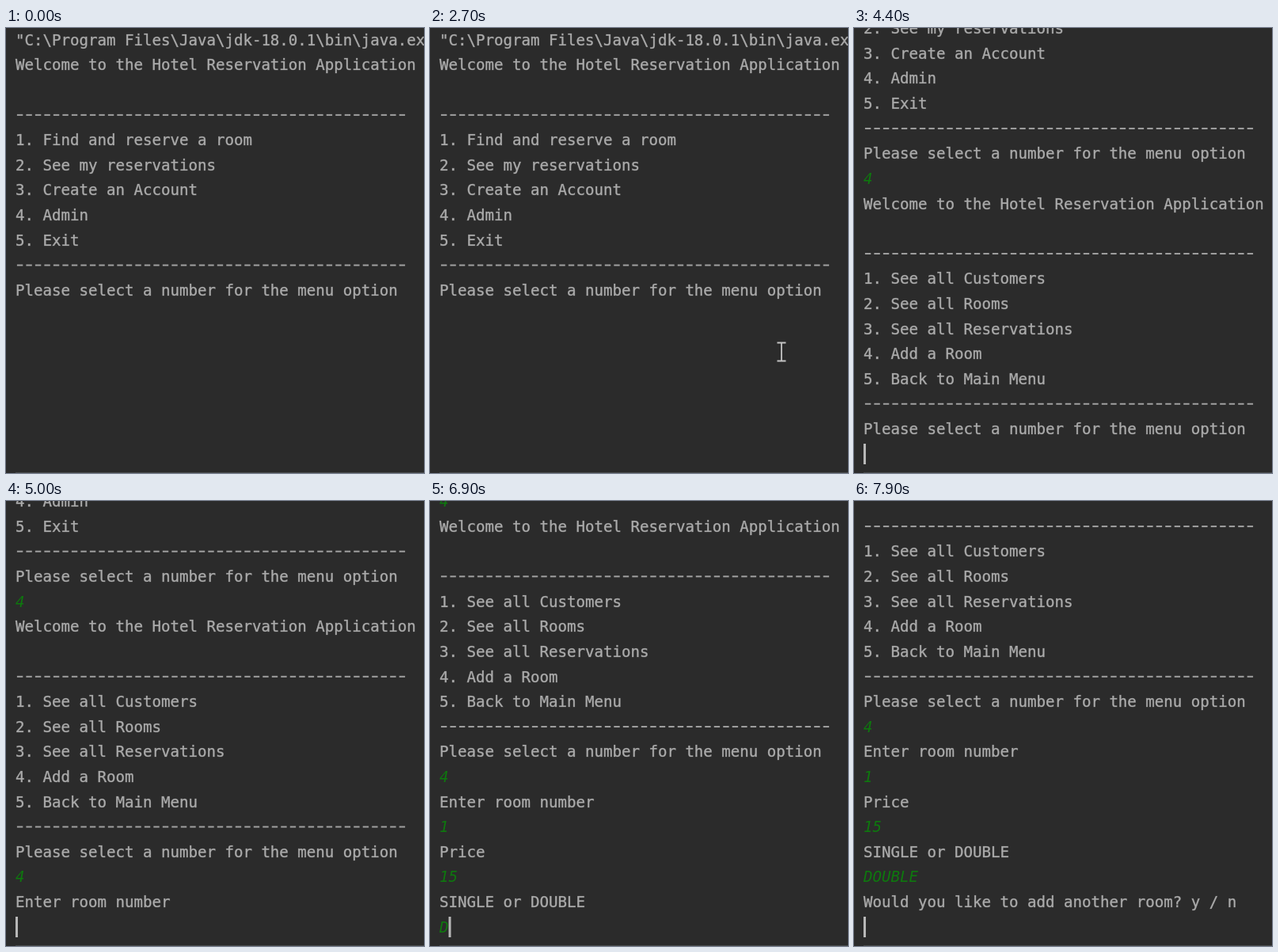
Recreate the animation shown at these times as an HTML page with a canvas. Size 528 by 562 pixels, loop 8 s.

```html
<!DOCTYPE html>
<html lang="en">
<head>
<meta charset="utf-8">
<title>Hotel reservation console</title>
<style>
  html, body { margin: 0; width: 100%; height: 100%; overflow: hidden; background: #2b2b2b; }
  canvas { display: block; }
</style>
</head>
<body>
<canvas id="stage" width="528" height="562"></canvas>
<script>
const ctx = document.getElementById("stage").getContext("2d");
const LOOP = 8000, LEFT = 12, TOP = 15, CELL = 11.495, ROW = 31.62, LAST_ROW = 538;
const BLINK = 260, FOCUS = 800;
const FONT = '19.1px "DejaVu Sans Mono", "Noto Sans Mono", monospace';
const RULE = "-".repeat(43);
const PROMPT = "Please select a number for the menu option";

const menu = items => [
  "Welcome to the Hotel Reservation Application", "", RULE,
  ...items.map((item, i) => `${i + 1}. ${item}`), RULE, PROMPT
];

const intro = ['"C:\\Program Files\\Java\\jdk-18.0.1\\bin\\java.exe"', ...menu([
  "Find and reserve a room", "See my reservations", "Create an Account", "Admin", "Exit"
])];

// Each entry: typed text, first key time, time between keys, Enter time, reply.
const inputs = [
  { text: "4", start: 3100, gap: 0, enter: 3340, reply: menu([
    "See all Customers", "See all Rooms", "See all Reservations", "Add a Room", "Back to Main Menu"
  ]) },
  { text: "4", start: 4900, gap: 0, enter: 4980, reply: ["Enter room number"] },
  { text: "1", start: 5800, gap: 0, enter: 5980, reply: ["Price"] },
  { text: "15", start: 6080, gap: 100, enter: 6440, reply: ["SINGLE or DOUBLE"] },
  { text: "DOUBLE", start: 6900, gap: 130, enter: 7700, reply: ["Would you like to add another room? y / n"] }
];

function consoleAt(t) {
  const lines = intro.map(text => ({ text }));
  let typed = "", lastKey = FOCUS;
  for (const { text, start, gap, enter, reply } of inputs) {
    if (t < start) break;
    if (t < enter) {
      const count = gap ? Math.min(text.length, 1 + Math.floor((t - start) / gap)) : text.length;
      typed = text.slice(0, count);
      lastKey = start + (count - 1) * gap;
      break;
    }
    lines.push({ text, input: true }, ...reply.map(text => ({ text })));
    lastKey = enter;
  }
  lines.push({ text: typed, input: true });
  const caret = t >= lastKey && Math.floor((t - lastKey) / BLINK) % 2 === 0;
  return { lines, caret, column: typed.length };
}

function drawLine({ text, input }, y) {
  if (text === RULE) {
    ctx.fillStyle = "#a0a0a0";
    for (let i = 0; i < RULE.length; i++) ctx.fillRect(LEFT + 1.9 + i * CELL, y - 1, 7.4, 2);
    return;
  }
  ctx.font = (input ? "italic " : "") + FONT;
  ctx.fillStyle = input ? "#0e780e" : "#acacac";
  ctx.fillText(text, LEFT, y + 6.7);
  if (input) return;
  // A faint outline gives the heavier, softer strokes.
  ctx.strokeStyle = "rgba(172, 172, 172, 0.5)";
  ctx.lineWidth = 0.7;
  ctx.strokeText(text, LEFT, y + 6.7);
}

function drawPointer(x, y) {
  ctx.strokeStyle = "#c4c4c4";
  ctx.lineWidth = 1.8;
  ctx.beginPath();
  ctx.moveTo(x, y - 10);
  ctx.lineTo(x, y + 11);
  for (const end of [y - 11, y + 12]) {
    ctx.moveTo(x - 5.5, end);
    ctx.lineTo(x + 5.5, end);
  }
  ctx.stroke();
}

function draw(t) {
  ctx.fillStyle = "#2b2b2b";
  ctx.fillRect(0, 0, 528, 562);
  const { lines, caret, column } = consoleAt(t);
  const end = Math.min(LAST_ROW, TOP + (lines.length - 1) * ROW);
  lines.forEach((line, i) => drawLine(line, end - (lines.length - 1 - i) * ROW));
  if (caret) {
    ctx.fillStyle = "#b8b8b8";
    ctx.fillRect(LEFT + column * CELL, end - 13, 3, 26);
  }
  if (t >= 600 && t < 4200) drawPointer(444, 408.5);
  ctx.fillStyle = "#484a4b";
  ctx.fillRect(LEFT, 561, 516, 1);
}

const began = performance.now();
function frame() {
  draw((performance.now() - began) % LOOP);
  requestAnimationFrame(frame);
}
frame();
</script>
</body>
</html>
```
